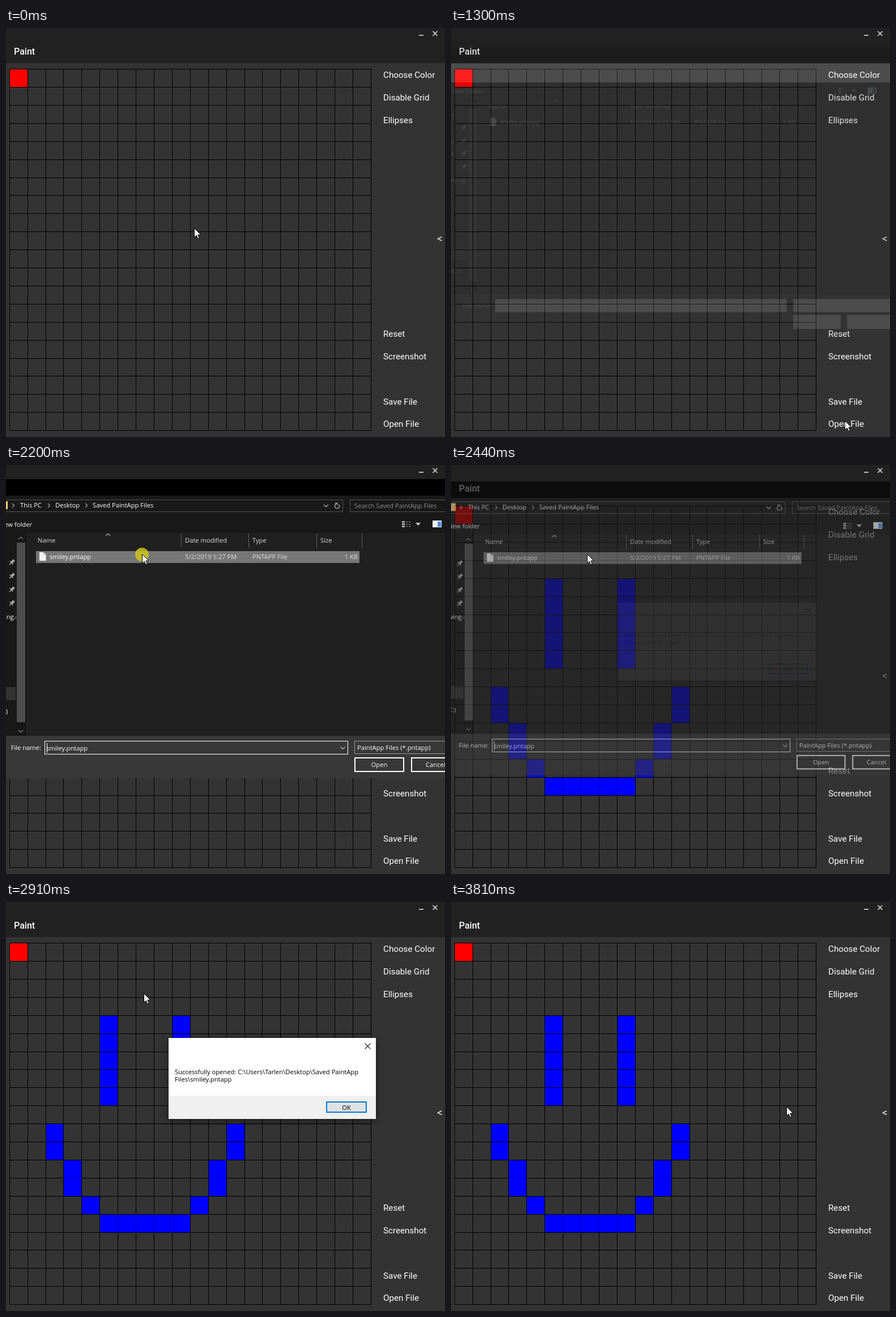
These frames come from a looping animation (775 by 722 pixels, 4.31 s). An HTML page with a canvas:

```html
<!DOCTYPE html>
<html lang="en">
<head>
<meta charset="utf-8">
<title>Paint</title>
<style>
html, body { margin: 0; width: 100%; height: 100%; overflow: hidden; background: #333; }
canvas { display: block; }
</style>
</head>
<body>
<canvas id="stage" width="775" height="722"></canvas>
<script>
const LOOP = 4310, TICK = 47.36, OFFSET = 18;
const stage = document.getElementById('stage').getContext('2d');
const APP_FONT = 'Roboto, sans-serif';
const UI_FONT = '11.2px "Open Sans", sans-serif';
const PAD = 60;

function makeLayer() {
  const canvas = document.createElement('canvas');
  canvas.width = 900;
  canvas.height = 722;
  const ctx = canvas.getContext('2d');
  ctx.translate(PAD, 0);
  return ctx;
}
const dialogLayer = makeLayer();
const messageLayer = makeLayer();

// Timing, in ticks
const clamp = u => Math.max(0, Math.min(1, u));
const linear = u => u;
const easeIn = u => u * u;
const easeOut = u => u * (2 - u);
const smooth = u => u * u * (3 - 2 * u);
const rise = (k, start, length) => smooth(clamp((k - start) / length));
const within = (k, from, to) => k >= from && k < to;

const path = [
  [3, 332, 354], [18, 695, 694, smooth], [29, 695, 694],
  [35, 500, 460, easeIn], [38, 247, 186, linear], [41, 240, 158, easeOut],
  [60, 240, 158], [61, 243, 162], [71, 592, 362, smooth]
];
const clicks = [[22, 24], [46, 48], [49, 50], [74, 75]];

function pointerAt(k) {
  if (k <= path[0][0]) return path[0].slice(1, 3);
  const i = path.findIndex(p => p[0] >= k);
  if (i < 0) return path[path.length - 1].slice(1, 3);
  const [k0, x0, y0] = path[i - 1];
  const [k1, x1, y1, ease = linear] = path[i];
  const u = ease((k - k0) / (k1 - k0));
  return [Math.round(x0 + (x1 - x0) * u), Math.round(y0 + (y1 - y0) * u)];
}

// Drawing helpers
function box(c, x, y, w, h, fill) {
  c.fillStyle = fill;
  c.fillRect(x, y, w, h);
}
function frame(c, x, y, w, h, color, width = 1) {
  c.strokeStyle = color;
  c.lineWidth = width;
  c.strokeRect(x + width / 2, y + width / 2, w - width, h - width);
}
function line(c, color, width, ...points) {
  c.beginPath();
  for (let i = 0; i < points.length; i += 2) c.lineTo(points[i], points[i + 1]);
  c.strokeStyle = color;
  c.lineWidth = width;
  c.stroke();
}
function text(c, str, x, y, color = '#fff', align = 'left', font = UI_FONT) {
  c.font = font;
  c.fillStyle = color;
  c.textAlign = align;
  c.fillText(str, x, y);
}
function cross(c, x, y, r, color, width) {
  line(c, color, width, x - r, y - r, x + r, y + r);
  line(c, color, width, x - r, y + r, x + r, y - r);
}
function chevron(c, x, y, dy, r = 4, color = '#bbb') {
  line(c, color, 1.2, x - r, y - dy, x, y + dy, x + r, y - dy);
}

// Paint window
const gridX = i => Math.floor(6.3 + 31.9 * i);
const gridY = i => Math.floor(72.6 + 31.9 * i);
// column, row, columns, rows, faint inner lines
const face = [
  [5, 4, 1, 5], [9, 4, 1, 5], [2, 10, 1, 2], [12, 10, 1, 2],
  [3, 12, 1, 2, true], [11, 12, 1, 2, true], [4, 14, 1, 1], [10, 14, 1, 1],
  [5, 15, 5, 1, true]
];
const menu = [
  ['Choose Color', 88], ['Disable Grid', 127.7], ['Ellipses', 167.5], ['Reset', 545],
  ['Screenshot', 585], ['Save File', 664.5], ['Open File', 704.4]
];

function fillCells(c, [col, row, cols, rows], color) {
  const x = gridX(col) + 1, y = gridY(row) + 1;
  box(c, x, y, gridX(col + cols) - x, gridY(row + rows) - y, color);
}

function drawTitleButtons(c) {
  box(c, 729, 12, 8, 1.6, '#ddd');
  cross(c, 757.5, 9.7, 4, '#ddd', 1.6);
}

function drawApp(c, loaded) {
  box(c, 0, 0, 775, 722, '#333');
  box(c, 0, 0, 775, 62, '#212121');
  text(c, 'Paint', 14, 46.5, '#fff', 'left', '500 16px ' + APP_FONT);
  drawTitleButtons(c);

  fillCells(c, [0, 0, 1, 1], '#f00');
  if (loaded) face.forEach(run => fillCells(c, run, '#00f'));
  for (let i = 0; i <= 20; i++) {
    box(c, gridX(i), gridY(0), 1, 639, '#000');
    box(c, gridX(0), gridY(i), 639, 1, '#000');
  }
  if (loaded) face.filter(run => run[4]).forEach(run => fillCells(c, run, 'rgba(0,0,255,.75)'));

  for (const [label, y] of menu) text(c, label, 666, y, '#fff', 'left', '15.2px ' + APP_FONT);
  text(c, '<', 761, 378, '#eee', 'left', '19px ' + APP_FONT);
}

// File dialog
function drawPin(c, x, y) {
  c.save();
  c.translate(x, y);
  c.rotate(Math.PI / 4);
  box(c, -2, -6, 4, 6, '#aaa');
  box(c, -4, 0, 8, 1.6, '#aaa');
  box(c, -.6, 1, 1.2, 5, '#aaa');
  c.restore();
}

function drawAddressRow(c) {
  frame(c, -50, 61, 645, 22, '#535353');
  frame(c, 607, 61, 200, 22, '#535353');
  box(c, -12, 64, 15, 14, '#f0cf78');
  for (const x of [13, 76, 142]) line(c, '#aaa', 1.2, x - 2, 68, x + 1.5, 71.5, x - 2, 75);
  text(c, 'This PC', 25, 75);
  text(c, 'Desktop', 87, 75);
  text(c, 'Saved PaintApp Files', 153, 75);
  chevron(c, 565, 72, 2);
  c.beginPath();
  c.arc(584.5, 72.5, 4.2, -.7, 4.2);
  c.strokeStyle = '#bbb';
  c.lineWidth = 1.3;
  c.stroke();
  line(c, '#bbb', 1.3, 581, 67.5, 585, 67.5, 585, 71);
  text(c, 'Search Saved PaintApp Files', 615, 76, '#8c8c8c');
}

function drawToolbar(c) {
  text(c, 'New folder', 46, 109, '#fff', 'right');
  for (let i = 0; i < 3; i++) {
    box(c, 699, 99 + i * 4, 5, 3, '#aaa');
    box(c, 706, 100 + i * 4, 3, 1, '#aaa');
    box(c, 711, 100 + i * 4, 3, 1, '#aaa');
  }
  c.beginPath();
  c.moveTo(723, 102);
  c.lineTo(732, 102);
  c.lineTo(727.5, 107);
  c.fillStyle = '#ccc';
  c.fill();
  box(c, 753, 98, 16, 12, '#eee');
  box(c, 762, 100, 6, 9, '#4a90d9');
}

function drawNavigation(c) {
  box(c, -50, 120, 87, 358, '#191919');
  box(c, -50, 392, 67, 23, '#333');
  ['Quick access', 'Downloads', 'Documents'].forEach((s, i) =>
    text(c, s, -7, [152, 200, 224][i], '#fff', 'right'));
  for (let i = 0; i < 4; i++) drawPin(c, 10, 172 + i * 24);
  text(c, 'drawing.c', 22, 272, '#fff', 'right');
  text(c, 'Disk (C:)', 3, 439, '#fff', 'right');
  box(c, 18, 120, 17, 358, '#171717');
  box(c, 19, 137, 15, 317, '#4d4d4d');
  chevron(c, 26, 129, -2, 4, '#888');
  chevron(c, 26, 470, 2, 4, '#888');
  box(c, 37, 120, 1, 358, '#2b2b2b');
}

function drawFileList(c, rowColor) {
  [['Name', 56], ['Date modified', 316], ['Type', 435], ['Size', 555]]
    .forEach(([s, x]) => text(c, s, x, 137, '#dedede'));
  for (const x of [309, 428, 548, 628]) box(c, x, 121, 1, 25, '#606060');
  chevron(c, 180, 123, -1.7);
  if (rowColor) box(c, 53, 152, 571, 21, rowColor);
  c.beginPath();
  c.moveTo(59, 154);
  c.lineTo(66.5, 154);
  c.lineTo(70.5, 158);
  c.lineTo(70.5, 169);
  c.lineTo(59, 169);
  c.fillStyle = '#f4f4f4';
  c.fill();
  line(c, '#aaa', 1, 66.5, 154, 66.5, 158, 70.5, 158);
  text(c, 'smiley.pntapp', 77, 166);
  text(c, '5/2/2019 5:27 PM', 316, 166, '#dedede');
  text(c, 'PNTAPP File', 435, 166, '#dedede');
  text(c, '1 KB', 621, 166, '#dedede', 'right');
}

function drawDialogFooter(c, fileName, light) {
  box(c, -50, 478, 880, 75, '#383838');
  text(c, 'File name:', 62, 503, '#fff', 'right');
  if (light) {
    box(c, 68, 487, 536, 24, '#fff');
    box(c, 616, 487, 182, 24, '#fff');
    box(c, 616, 516, 87, 26, '#fff');
    box(c, 715, 516, 83, 26, '#fff');
    return;
  }
  frame(c, 68, 487, 536, 24, '#fff');
  text(c, fileName, 71, 504);
  box(c, 72, 491, 1, 17, '#fff');
  chevron(c, 594.5, 499.5, 2);
  frame(c, 615, 487, 183, 23, '#9b9b9b');
  text(c, 'PaintApp Files (*.pntapp)', 620, 503);
  frame(c, 615, 516, 88, 26, '#fff', 2);
  text(c, 'Open', 659, 533, '#fff', 'center');
  frame(c, 715, 516, 83, 26, '#fff', 2);
  text(c, 'Cancel', 741, 533);
}

function drawDialog(k) {
  const c = dialogLayer;
  const light = k < 29;
  c.clearRect(-PAD, 0, 900, 722);
  box(c, -50, 25, 880, 29, '#000');
  box(c, -50, 54, 880, 66, '#191919');
  box(c, -50, 120, 880, 358, '#202020');
  if (light) box(c, -50, 54, 880, 35, '#fff');
  else drawAddressRow(c);
  drawToolbar(c);
  drawNavigation(c);
  drawFileList(c, k >= 46 ? '#777' : k >= 39 ? '#4d4d4d' : null);
  drawDialogFooter(c, k >= 46 ? 'smiley.pntapp' : '', light);
}

// Message box
function drawMessage(k) {
  const c = messageLayer;
  c.clearRect(-PAD, 0, 900, 722);
  c.shadowColor = 'rgba(0,0,0,.45)';
  c.shadowBlur = 12;
  c.shadowOffsetY = 3;
  box(c, 287, 240, 366, 143, '#fff');
  c.shadowColor = 'transparent';
  box(c, 287, 342, 366, 41, '#f0f0f0');
  cross(c, 638.5, 254.5, 5, '#222', 1.1);
  text(c, 'Successfully opened: C:\\Users\\Tarlen\\Desktop\\Saved PaintApp', 298, 304, '#000');
  text(c, 'Files\\smiley.pntapp', 298, 317, '#000');
  box(c, 565, 352, 72, 20, k >= 70 ? '#e5f1fb' : '#e1e1e1');
  frame(c, 565, 352, 72, 20, '#0078d7', 2);
  text(c, 'OK', 601, 367, '#000', 'center');
}

function showLayer(layer, alpha, cx, cy) {
  const scale = .955 + .045 * alpha;
  stage.save();
  stage.globalAlpha = alpha;
  stage.translate(cx, cy);
  stage.scale(scale, scale);
  stage.drawImage(layer.canvas, -cx - PAD, -cy);
  stage.restore();
}

function drawPointer(c, k) {
  const [x, y] = pointerAt(k);
  if (clicks.some(([from, to]) => within(k, from, to))) {
    c.beginPath();
    c.arc(x, y, 12, 0, 2 * Math.PI);
    c.fillStyle = 'rgba(212,203,28,.8)';
    c.fill();
  }
  c.save();
  c.translate(x + .5, y - .5);
  c.beginPath();
  [[0, 0], [0, 16], [3.7, 12.6], [6.3, 18.2], [8.8, 17.1], [6.3, 11.6], [11.3, 11.4]]
    .forEach(p => c.lineTo(...p));
  c.closePath();
  c.fillStyle = '#fff';
  c.fill();
  c.strokeStyle = '#000';
  c.lineWidth = 1;
  c.stroke();
  c.restore();
}

function render(now) {
  const k = Math.floor((now % LOOP - OFFSET) / TICK);
  const dialogAlpha = rise(k, 25.9, 5) * (1 - rise(k, 49, 4.8));
  const messageAlpha = rise(k, 50.5, 4) * (1 - rise(k, 75.5, 4.5));

  drawApp(stage, k >= 51);
  if (dialogAlpha > 0) {
    drawDialog(k);
    showLayer(dialogLayer, dialogAlpha, 316, 269);
  }
  if (messageAlpha > 0) {
    drawMessage(k);
    showLayer(messageLayer, messageAlpha, 470, 311.5);
  }
  drawPointer(stage, k);
}

const start = performance.now();
function loop() {
  render(performance.now() - start);
  requestAnimationFrame(loop);
}
loop();
</script>
</body>
</html>
```
